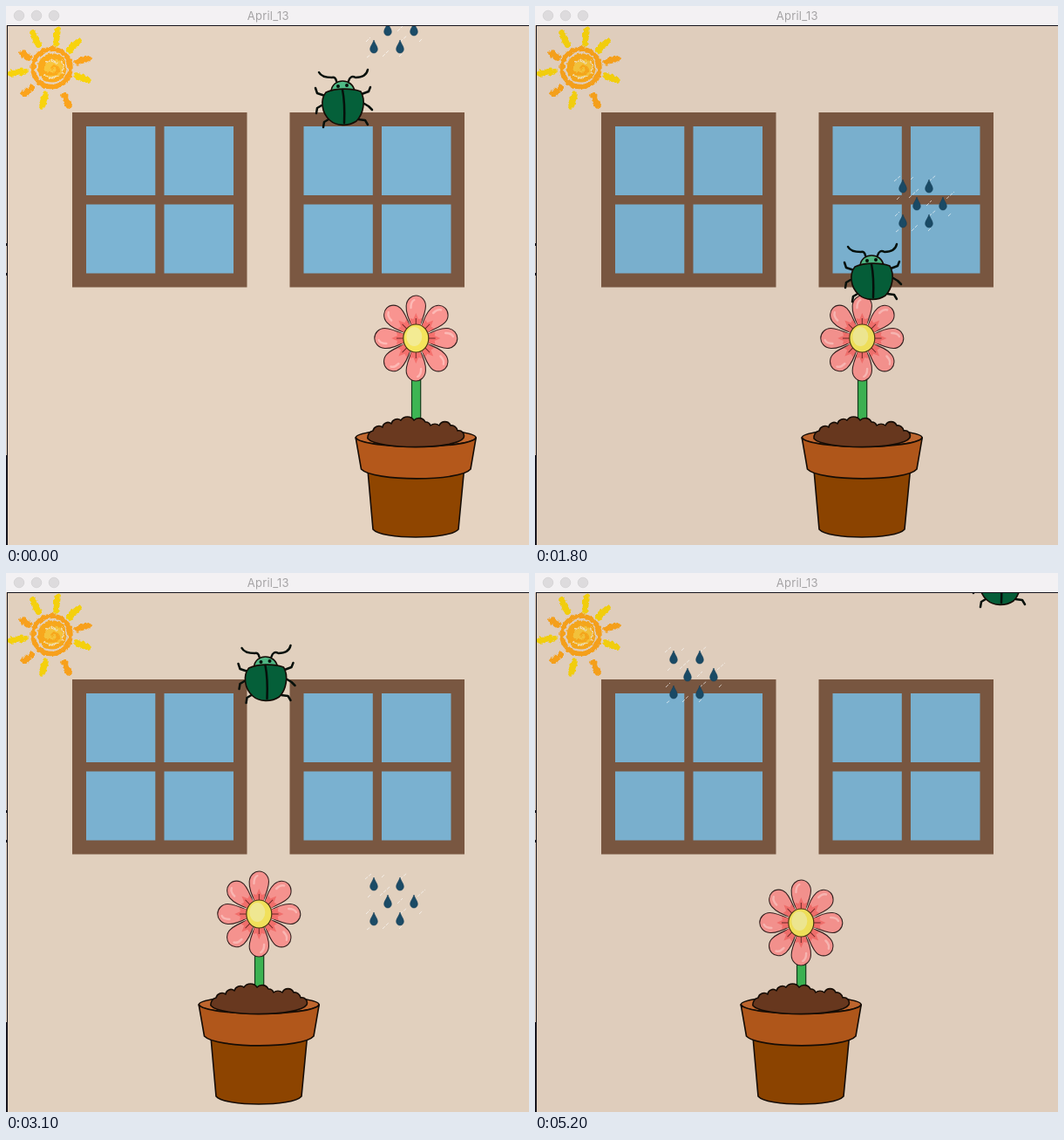
Recreate the animation shown at these times as an HTML page. Size 600 px wide and 618 px high, loop 5300 ms.

```html
<!DOCTYPE html>
<html>
<head>
<meta charset="utf-8">
<title>April_13</title>
<style>
  html, body { margin: 0; width: 100%; height: 100%; overflow: hidden; }
  svg { display: block; }
  text { font: 13px Inter, sans-serif; letter-spacing: .25px; fill: #a5a3a5; text-anchor: middle; }
  .ink { stroke: #150c05; stroke-width: 1.6; stroke-linejoin: round; }
  .legs { fill: none; stroke: #06100b; stroke-width: 2.5; stroke-linecap: round; stroke-linejoin: round; }
</style>
</head>
<body>
<svg width="600" height="618" viewBox="0 0 600 618">
  <defs>
    <clipPath id="content"><path d="M2 23H600V618H2z"/></clipPath>
    <filter id="crayon">
      <feTurbulence type="fractalNoise" baseFrequency=".25" numOctaves="2" seed="4"/>
      <feDisplacementMap in="SourceGraphic" scale="5" xChannelSelector="R" yChannelSelector="G"/>
    </filter>
    <g id="window">
      <path fill="#7b5842" d="M76 122h200.500v200.500H76z"/>
      <path fill="#7cb4d3" d="M92 138h79.300v79H92zM181.500 138h79.500v79h-79.500zM92 227.500h79.300v79H92zM181.500 227.500h79.500v79h-79.500z"/>
    </g>
    <path id="drop" fill="#1b4c68" stroke="#153f58" stroke-width=".6" d="M0-8C1-4 4.300-1 4.300 2.500A4.300 4.500 0 0 1-4.300 2.500C-4.300-1-1-4 0-8z"/>
    <g id="petal">
      <path fill="#f99490" stroke="#33201f" stroke-width="1.100" d="M-4-13C-9-22-12-29-11.500-37C-11-45-5-49 0-49C6-49 11.500-44 11.500-37C11.500-30 8-22 4-13z"/>
      <path fill="#f5706d" d="M-5-13L-7-23L-3-22L0-29L3-22L7-23L5-13z"/>
      <path fill="none" stroke="#fdb9b5" stroke-width="2.500" stroke-linecap="round" d="M-6-35Q-6-42-2-44"/>
      <path stroke="#6b2424" d="M0-15V-23"/>
    </g>
  </defs>

  <path fill="#f3f1f3" d="M0 0H600V22H0z"/>
  <g fill="#dddbdd" stroke="#d0ced0" stroke-width=".7">
    <circle cx="15" cy="11" r="5.800"/><circle cx="35" cy="11" r="5.800"/><circle cx="55" cy="11" r="5.800"/>
  </g>
  <text x="300.800" y="16">April_13</text>
  <path fill="#e5d3c1" d="M0 22H600V618H0z"/>
  <path fill="#15131c" d="M1 22H600V23H2V618H0V515H1zM0 272h1v3H0zM0 306h1v3H0z"/>

  <g clip-path="url(#content)">
    <use href="#window"/><use href="#window" x="249.500"/>

    <g fill="none" stroke-linecap="round" filter="url(#crayon)">
      <path stroke="#f8d30c" stroke-width="7.500" d="M59 28L57 43M83 41L73 50M94 85L82 80M41 115L45 102M6 77L21 75M31 31L37 44"/>
      <path stroke="#fba31a" stroke-width="7.500" d="M94 60L82 64M72 114L67 103M21 101L29 94M19 54L26 59"/>
      <circle cx="52.500" cy="71" r="21.500" stroke="#fba31a" stroke-width="5.500"/>
      <circle cx="53" cy="71" r="14" fill="#f9c63c" stroke="#fbaa1e" stroke-width="5"/>
      <path stroke="#fbaa1e" stroke-width="3.500" d="M53 71q4-5 6 1t-8 6t-8-9t13-8"/>
      <path stroke="#f5e3b8" stroke-width="1.300" d="M46 65q7-6 13 1M43 79q9 7 18 1M63 62q5 7 2 15"/>
    </g>

    <g id="rain">
      <path fill="none" stroke="#fff" stroke-opacity=".65" stroke-dasharray="4 1.500" d="M-10-6l7-6M30-6l8-7M9-8l3-3M7 13l12-11M50 14l9-8M-7 15l4-4M27 22l6-6M-9 34l5-5M30 34l8-7M10 51l7-7M52 34l4-4M-8 52l4-3M29 51l3-3"/>
      <use href="#drop"/><use href="#drop" x="30"/>
      <use href="#drop" x="16" y="20"/><use href="#drop" x="46" y="20"/>
      <use href="#drop" y="40"/><use href="#drop" x="30" y="40"/>
    </g>

    <g id="plant">
      <ellipse class="ink" cx="-.8" cy="495" rx="69" ry="10" fill="#c2682f"/>
      <path class="ink" fill="#8f4500" d="M-56 532L-50 600C-40 612 38 612 48 600L54.500 532z"/>
      <path class="ink" fill="#b4581b" d="M-69.800 495L-63.500 531C-50 545.500 50 545.500 62 531L68.200 495C60 508.500-60 508.500-69.800 495z"/>
      <path fill="#3db553" stroke="#123c1b" stroke-width="1.200" d="M-5.500 400H4.700V482H-5.500z"/>
      <path class="ink" fill="#6a391f" d="M-56 496a8 8 0 0 1 6-9a7 7 0 0 1 11-4a6 6 0 0 1 10-4a7 7 0 0 1 11-4a9 9 0 0 1 15 0a8 8 0 0 1 13 2a6 6 0 0 1 6 4a8 8 0 0 1 10 0a7 7 0 0 1 13 0a7 7 0 0 1 8 6a6 6 0 0 1 7 8C45 509-45 509-56 496z"/>
      <g id="head"></g>
    </g>

    <g id="bug">
      <path class="legs" d="M-8-30Q-9-35-13-34Q-25-34-28-40M6-30Q8-37 14-34Q26-34 28-43M-21-13L-30-16L-32-22M21-15L29-18L31-23M-25-2L-30 1L-31 7M24-4L29-1L33 3M-17 14L-22 17L-23 23M17 14L25 15L28 20"/>
      <path class="ink" fill="#4fb985" d="M-14-18C-13-34 11-34 13-18z"/>
      <path fill="#05110b" d="M-8-24a2 2 0 1 0 4 0a2 2 0 1 0-4 0M2-25a2 2 0 1 0 4 0a2 2 0 1 0-4 0"/>
      <path class="ink" fill="#05603a" d="M-20-17C-9-22 10-22 20-18C26-8 23 8 15 16C6 22-8 22-15.500 15C-25.500 6-26.500-9-20-17z"/>
      <path class="legs" d="M-1-20Q2-5 1 18"/>
    </g>
    <path id="shade" d="M2 23H600V618H2z"/>
  </g>
</svg>
<script>
const LOOP = 5300, STEP = 100, FALL = 5;
const el = id => document.getElementById(id);
const place = (id, x, y) => el(id).setAttribute('transform', `translate(${x} ${y})`);

// Keys are [ms, value]; the plant's values count 5 px steps to the left.
const walk = [[0, 0], [600, 10], [1800, 19], [2600, 33], [3700, 39], [4500, 39], [5200, 33], [LOOP, 33]];
const dim = [[0, 0], [500, 1], [1800, .8], [2600, 0], [3700, 1], [4500, 1], [5200, .8], [LOOP, .8]];
// Each fall starts at a tick: [tick, x, y].
const bugs = [[0, 387, 116], [42, 298.5, -14], [112, 534, -14]];
const rains = [[0, 422, 7], [90, 159, -43]];

el('head').innerHTML = '<g transform="scale(.97 1)">' +
  [45, 135, 225, 315, 0, 90, 180, 270].map(a => `<use href="#petal" transform="rotate(${a})"/>`).join('') +
  '</g><ellipse rx="14.500" ry="16" fill="#f5e45c" stroke="#4a3a12" stroke-width="1.200"/>' +
  '<ellipse cx="-2" cy="-2" rx="9" ry="11" fill="#f3eb93"/>';

function valueAt(keys, t) {
  const i = keys.findIndex(k => k[0] > t);
  const [t0, a] = keys[i - 1], [t1, b] = keys[i];
  return a + (b - a) * (t - t0) / (t1 - t0);
}

function fall(id, starts, tick) {
  const [from, x, y] = starts.filter(s => s[0] <= tick).pop();
  place(id, x, y + FALL * (tick - from));
}

function draw() {
  const t = Math.floor(performance.now() % LOOP / STEP) * STEP;
  const tick = Math.floor(t * .02271);
  const hits = bugs.filter(b => b[0] && b[0] <= tick).length;
  fall('bug', bugs, tick);
  fall('rain', rains, tick);
  place('plant', 471 - 5 * Math.round(valueAt(walk, t)), 0);
  place('head', -.7, 381 + 10 * hits);
  el('shade').setAttribute('opacity', .034 * valueAt(dim, t));
  requestAnimationFrame(draw);
}
draw();
</script>
</body>
</html>
```
